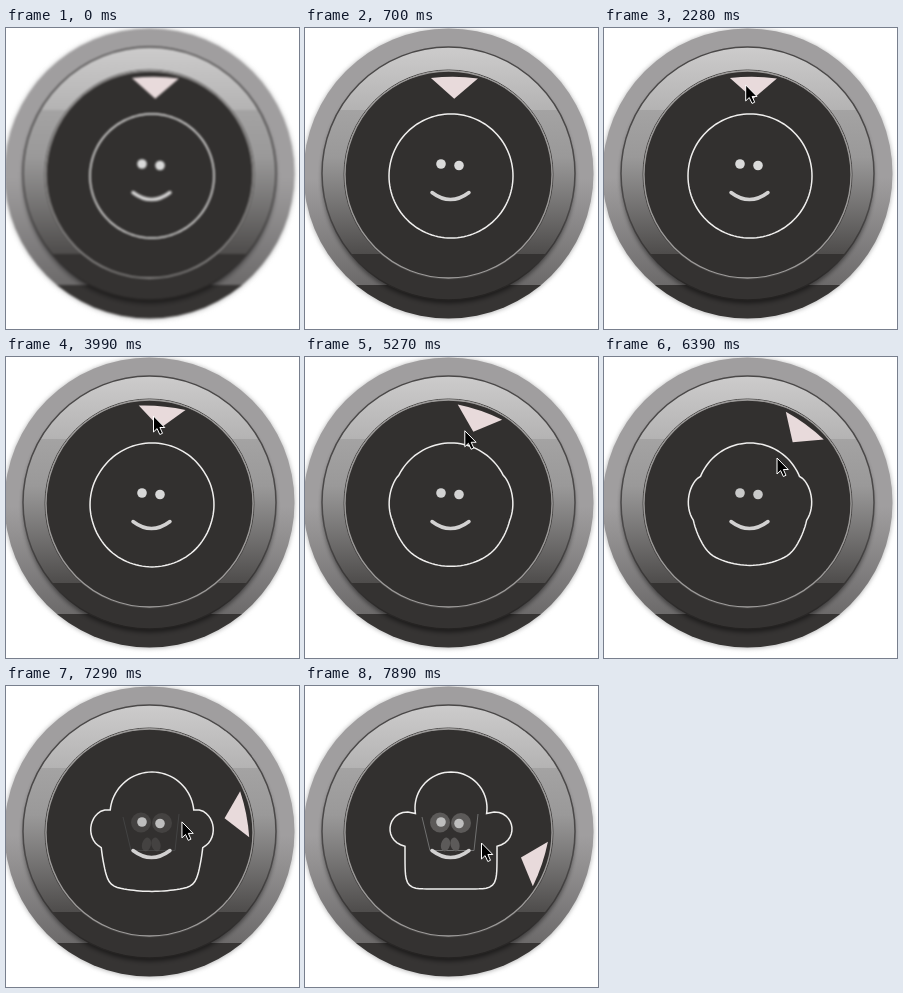
An HTML page that plays this animation: 293x301 px, repeating every 7.99 s.

```html
<!DOCTYPE html>
<html lang="en">
<head>
<meta charset="utf-8">
<title>Dial</title>
<style>
html, body { margin: 0; width: 100%; height: 100%; overflow: hidden; background: #fff; }
svg { display: block; width: 100vw; height: 100vh; }
</style>
</head>
<body>
<svg viewBox="0 0 293 301">
  <defs>
    <linearGradient id="rim" gradientUnits="userSpaceOnUse" x1="0" y1="0" x2="0" y2="300">
      <stop offset=".5" stop-color="#a09e9f"/>
      <stop offset=".857" stop-color="#6c6a6a"/>
      <stop offset=".857" stop-color="#363433"/>
    </linearGradient>
    <linearGradient id="ring" gradientUnits="userSpaceOnUse" x1="0" y1="0" x2="0" y2="300">
      <stop offset=".06" stop-color="#cdcccc"/>
      <stop offset=".273" stop-color="#b4b3b3"/>
      <stop offset=".273" stop-color="#a4a3a3"/>
      <stop offset=".43" stop-color="#9a9999"/>
      <stop offset=".755" stop-color="#4e4c4b"/>
      <stop offset=".755" stop-color="#343231"/>
    </linearGradient>
    <linearGradient id="edge" gradientUnits="userSpaceOnUse" x1="0" y1="0" x2="0" y2="300">
      <stop offset=".6" stop-color="#4a4848"/>
      <stop offset=".9" stop-color="#242221"/>
    </linearGradient>
    <filter id="soft" filterUnits="userSpaceOnUse" x="-20" y="-20" width="340" height="340" color-interpolation-filters="sRGB">
      <feGaussianBlur id="blur" stdDeviation="1"/>
    </filter>
    <filter id="shade" color-interpolation-filters="sRGB">
      <feGaussianBlur stdDeviation="2"/>
    </filter>
  </defs>
  <g id="scene">
    <circle cx="143.5" cy="146" r="145.5" fill="#bbb" filter="url(#shade)"/>
    <circle cx="143.5" cy="145.5" r="145" fill="url(#rim)"/>
    <circle cx="143.5" cy="149" r="126.5" opacity=".45" filter="url(#shade)"/>
    <circle cx="143.5" cy="145.5" r="126.5" fill="url(#ring)" stroke="url(#edge)" stroke-width="1.5"/>
    <circle cx="143.5" cy="146.5" r="104.5" fill="none" stroke="#454342"/>
    <circle cx="143.5" cy="146.5" r="103.5" fill="#32302f" stroke="#9c9a99" stroke-width="1.3"/>
    <path id="marker" d="M-23.5 0Q0 -3 23.5 0L0 20.5Z" fill="#e8dadb"/>
    <path id="head" fill="none" stroke="#f0efee" stroke-width="1.5"/>
    <path id="muzzle" d="M117 131L125 164.500H169L173 128" fill="none"/>
    <g id="ape" fill="#5c5a59">
      <circle cx="135" cy="136.5" r="10"/>
      <circle cx="156" cy="137" r="10"/>
      <ellipse cx="140.5" cy="158.500" rx="4.500" ry="7" transform="rotate(14 140.5 158.500)"/>
      <ellipse cx="150" cy="158.500" rx="4.500" ry="7" transform="rotate(-14 150 158.500)"/>
    </g>
    <g id="face">
      <circle cx="136" cy="136" r="4.8"/>
      <circle cx="154" cy="137.5" r="4.8"/>
      <path d="M127 164.500Q145.500 178.500 164 164.500" fill="none" stroke="#d2d1d1" stroke-width="3.5" stroke-linecap="round"/>
    </g>
  </g>
  <path id="cursor" d="M0 0V16L3.600 12.600L6.300 18.500L9 17.300L6.400 11.500H11.300Z" fill="#000" stroke="#fff"/>
</svg>
<script>
const LOOP = 7990, STEP = 60;
const BLUR_END = 800, ENTER = 980, DRAG = 3630;
const el = id => document.getElementById(id);
const lerp = (a, b, p) => a + (b - a) * p;
const ramp = (x, from, to) => Math.max(0, Math.min(1, (x - from) / (to - from)));

// Time, marker angle, pointer x and y.
const keys = [
  [ENTER, 3.5, 219, 135],
  [1480, 3.5, 159.5, 81],
  [2280, 3.5, 141, 56],
  [DRAG, 3.5, 141, 56],
  [3990, 7.5, 147.5, 59],
  [5270, 19.1, 160, 74],
  [6390, 36.2, 173, 101],
  [6810, 55, 175.5, 119],
  [7890, 108.7, 176.5, 157]
];
const first = keys[0], last = keys[keys.length - 1];

function pose(t) {
  const next = keys.findIndex(k => k[0] > t);
  if (next === 0) return first;
  if (next < 0) return last;
  const a = keys[next - 1], b = keys[next];
  const p = ramp(t, a[0], b[0]);
  return a.map((v, i) => lerp(v, b[i], p));
}

// Distance at which a ray from the head's middle leaves a circle.
function exit(dx, dy, cx, cy, r) {
  const along = dx * cx + dy * cy;
  const root = along * along - cx * cx - cy * cy + r * r;
  return root < 0 ? 0 : along + Math.sqrt(root);
}

// The ape's outline is the union of skull, ears and a rounded square jaw.
function apeRadius(dx, dy) {
  const side = Math.abs(dx);
  const skull = exit(dx, dy, 0, -26, 36);
  const ear = exit(side, dy, 44, -5, 17);
  const jaw = dy > 0 ? ((side / 46) ** 8 + (dy / 55) ** 8) ** (-1 / 8) : 0;
  return Math.max(skull, ear, jaw);
}

function headPath(p) {
  const points = [];
  for (let deg = 0; deg < 360; deg += 3) {
    const a = deg * Math.PI / 180;
    const dx = Math.sin(a), dy = -Math.cos(a);
    const r = lerp(62, apeRadius(dx, dy), p);
    points.push(`${146 + r * dx} ${148 + r * dy}`);
  }
  return `M${points.join('L')}Z`;
}

const gray = v => `rgb(${v},${v},${v})`;

function draw(time) {
  const offset = DRAG % STEP;
  const t = Math.floor((time - offset) / STEP) * STEP + offset;
  const [, angle, x, y] = pose(t);
  const turn = ramp(angle, first[1], last[1]);
  const ape = ramp(turn, 0.5, 1);

  const blur = 1 - ramp(t, 540, BLUR_END);
  el('blur').setAttribute('stdDeviation', blur);
  el('scene').setAttribute('filter', blur > 0 ? 'url(#soft)' : 'none');

  const tilt = 3 * (1 - ramp(angle, first[1], 15));
  el('marker').setAttribute('transform',
    `translate(143.5 147) rotate(${angle}) translate(0 -97) rotate(${-tilt})`);
  el('head').setAttribute('d', headPath(turn ** 1.25));
  el('face').setAttribute('fill', gray(Math.round(lerp(218, 190, ramp(turn, 0, 0.5)))));
  el('ape').setAttribute('opacity', ape);
  el('muzzle').setAttribute('stroke', gray(Math.round(lerp(32, 112, ape))));
  el('muzzle').setAttribute('opacity', ramp(turn, 0.35, 0.6));

  el('cursor').setAttribute('transform', `translate(${x} ${y})`);
  el('cursor').setAttribute('visibility', time < ENTER ? 'hidden' : 'visible');
}

const begin = performance.now();
function tick() {
  draw((performance.now() - begin) % LOOP);
  requestAnimationFrame(tick);
}
tick();
</script>
</body>
</html>
```
